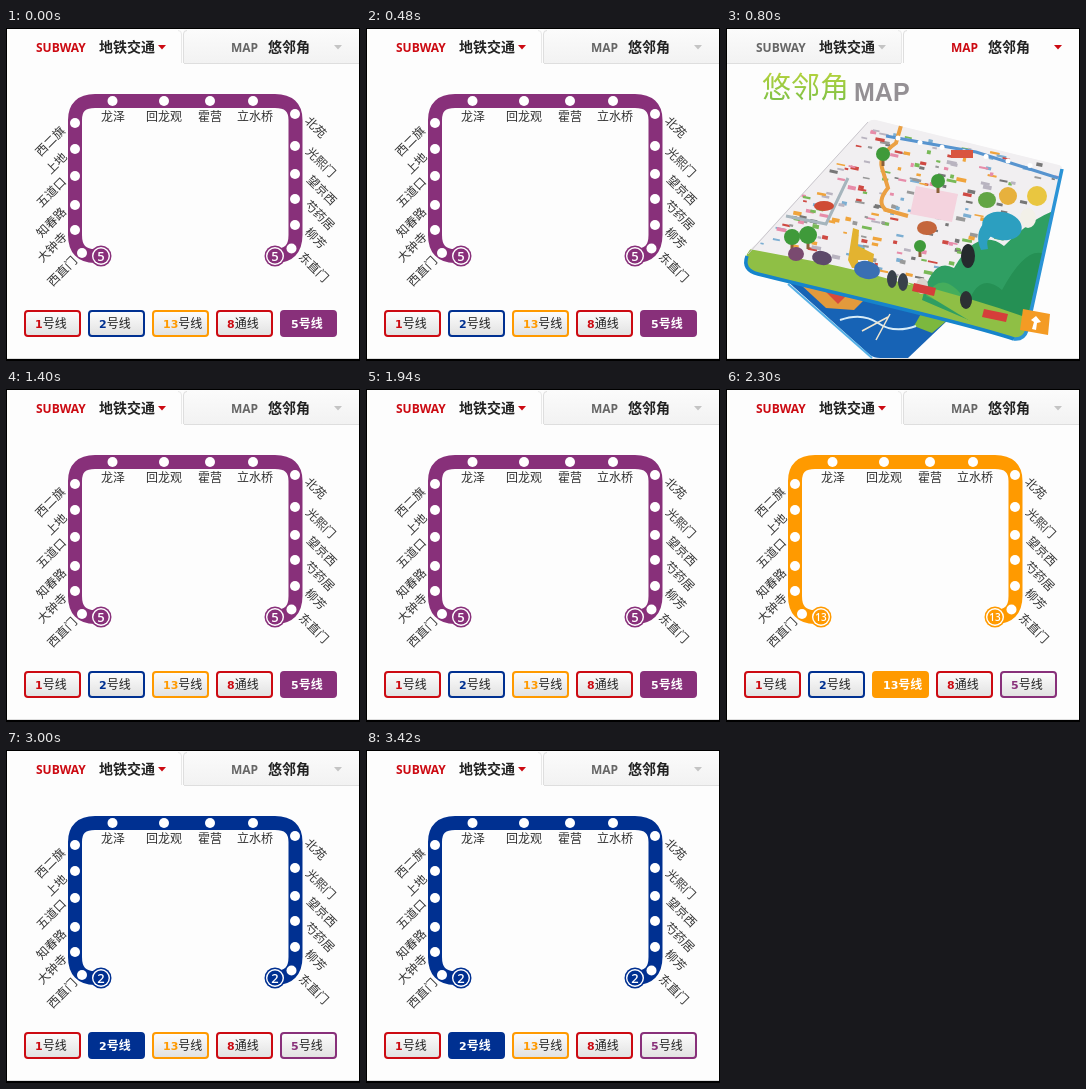
An HTML page with a canvas that plays this animation: 354 px wide and 333 px high, repeating every 3700 ms.

```html
<!DOCTYPE html>
<html lang="zh">
<head>
<meta charset="utf-8">
<title>Subway and map tabs</title>
<style>
html, body { margin: 0; width: 100%; height: 100%; overflow: hidden; background: #fff; }
canvas { display: block; }
</style>
</head>
<body>
<canvas id="stage" width="354" height="333"></canvas>
<script>
const ctx = document.getElementById('stage').getContext('2d');
const LATIN = '"Open Sans", sans-serif';
const DIGITS = '"DejaVu Sans", sans-serif';
const HAN = '"Noto Sans CJK SC", "Noto Sans CJK", sans-serif';
const RED = '#cc0a12', PURPLE = '#88307a', ORANGE = '#ff9a00', BLUE = '#003091';
const LOOP = 3700;

const scenes = [
  { at: 0, line: '5' },
  { at: 800, line: null },
  { at: 1400, line: '5' },
  { at: 2300, line: '13' },
  { at: 3000, line: '2' }
];

const lines = [
  { id: '1', label: '号线', color: RED },
  { id: '2', label: '号线', color: BLUE },
  { id: '13', label: '号线', color: ORANGE },
  { id: '8', label: '通线', color: RED },
  { id: '5', label: '号线', color: PURPLE }
];

// Each station: name, dot position, label centre, label angle in eighth turns.
const stations = [
  ['龙泽', 106.5, 73, 107, 88, 0],
  ['回龙观', 158, 73, 158, 88, 0],
  ['霍营', 204, 73, 204, 88, 0],
  ['立水桥', 247, 73, 249, 88, 0],
  ['西二旗', 69, 95, 44, 113, -1],
  ['上地', 69, 121, 50, 135, -1],
  ['五道口', 69, 148, 45, 164, -1],
  ['知春路', 69, 177, 45, 194, -1],
  ['大钟寺', 69, 202, 46, 219, -1],
  ['西直门', 76, 225, 56, 243, -1],
  ['北苑', 289, 86, 310, 99, 1],
  ['光熙门', 289, 118, 315, 134, 1],
  ['望京西', 289, 146, 316, 162, 1],
  ['芍药居', 289, 171, 314, 187, 1],
  ['柳芳', 289, 197, 310, 210, 1],
  ['东直门', 285.5, 220.5, 308, 239, 1]
];

function text(str, x, y, font, color, align = 'left') {
  ctx.font = font;
  ctx.fillStyle = color;
  ctx.textAlign = align;
  ctx.fillText(str, x, y);
}

function rect(x, y, w, h, color) {
  ctx.fillStyle = color;
  ctx.fillRect(x, y, w, h);
}

function ellipse(x, y, rx, ry, color, angle = 0) {
  ctx.beginPath();
  ctx.ellipse(x, y, rx, ry, angle, 0, Math.PI * 2);
  ctx.fillStyle = color;
  ctx.fill();
}

function shape(d, fill) {
  ctx.fillStyle = fill;
  ctx.fill(new Path2D(d));
}

function stroke(d, color, width) {
  ctx.strokeStyle = color;
  ctx.lineWidth = width;
  ctx.stroke(new Path2D(d));
}

function vertical(y0, y1, top, bottom) {
  const g = ctx.createLinearGradient(0, y0, 0, y1);
  g.addColorStop(0, top);
  g.addColorStop(1, bottom);
  return g;
}

function tab(x, w, latin, latinX, han, hanX, arrowX, active) {
  if (!active) {
    rect(x, 1, w, 34, vertical(2, 35, '#fbfbfb', '#f2f2f2'));
    rect(x, 35, w, 1, '#dedede');
  }
  text(latin, latinX, 24, `bold 12px ${LATIN}`, active ? RED : '#666');
  text(han, hanX, 24, `bold 14px ${HAN}`, '#222');
  shape(`M${arrowX} 17h8l-4 4.5z`, active ? RED : '#c4c4c4');
}

function drawFrame(mapOpen) {
  rect(0, 0, 354, 333, '#fdfdfd');
  tab(1, 174, 'SUBWAY', 30, '地铁交通', 93, 152, !mapOpen);
  tab(178, 175, 'MAP', 225, '悠邻角', 262, 328, mapOpen);
  stroke('M177.5 35V6Q177.5 2.5 181 2.5', '#dedede', 1);
  stroke('M175.5 35V6Q175.5 2.5 172 2.5', '#e8e8e8', 1);
  rect(1, 330, 352, 1, '#ddd');
  rect(0, 331, 354, 2, '#000');
  ctx.strokeStyle = '#000';
  ctx.lineWidth = 1;
  ctx.strokeRect(0.5, 0.5, 353, 332);
}

function badge(x, id, color) {
  ellipse(x, 228, 10.5, 10.5, color);
  ellipse(x, 228, 9, 9, '#fff');
  ellipse(x, 228, 7.6, 7.6, color);
  const size = id.length > 1 ? 10 : 13;
  text(id, x, 228 + size * 0.36, `600 ${size}px ${LATIN}`, '#fff', 'center');
}

function drawSubway(id) {
  const { color } = lines.find(line => line.id === id);
  stroke('M95 228H89Q69 228 69 207V92Q69 73 89 73H269Q289.5 73 289.5 92V207Q289.5 228 269 228',
    color, 14);
  badge(95, id, color);
  badge(269, id, color);
  for (const [name, x, y, lx, ly, turn] of stations) {
    ellipse(x, y, 5, 5, '#fff');
    ctx.save();
    ctx.translate(lx, ly);
    ctx.rotate(turn * Math.PI / 4);
    text(name, 0, 4.5, `12px ${HAN}`, '#333', 'center');
    ctx.restore();
  }
  lines.forEach((line, i) => button(line, 18 + i * 64, line.id === id));
}

function button({ id, label, color }, x, selected) {
  ctx.beginPath();
  ctx.roundRect(x + 1, 283, 55, 25, 3);
  ctx.fillStyle = selected ? color : vertical(284, 307, '#fcfcfc', '#e2e2e2');
  ctx.fill();
  ctx.strokeStyle = color;
  ctx.lineWidth = 2;
  ctx.stroke();
  text(id, x + 11, 300, `bold 11px ${DIGITS}`, selected ? '#fff' : color);
  const digitWidth = ctx.measureText(id).width;
  text(label, x + 11 + digitWidth, 300, `${selected ? 700 : 400} 12px ${HAN}`, selected ? '#fff' : '#222');
}

function seeded(seed) {
  return () => (seed = (seed * 16807) % 2147483647) / 2147483647;
}

function tree(x, y, r) {
  rect(x - 1.5, y, 3, r + 5, '#8a6038');
  ellipse(x, y, r, r, '#3f9a3a');
}

// Small slanted captions and icons scattered along the cloth.
function printedDetails() {
  const random = seeded(73);
  const tints = ['#e78ca9', '#999', '#f0a43c', '#777', '#78b957', '#b9b4c0', '#7caed2', '#cf4a43'];
  for (let i = 0; i < 230; i++) {
    const u = random(), v = random();
    ctx.save();
    ctx.translate(147 + 189 * u - 118 * v, 94 + 46 * u + 120 * v);
    ctx.rotate(0.2);
    rect(0, 0, 3 + random() * 7, 1.5 + random() * 2.5, tints[i % tints.length]);
    ctx.restore();
  }
}

function drawLowerLayer() {
  shape('M60 252L144 327Q148 330 154 330H182L224 290Z', '#1763b5');
  shape('M74 256L140 270L128 282L100 280Z', '#e39a3c');
  shape('M98 262l24 4-10 10z', '#d94a3c');
  shape('M196 284L224 290L206 305L188 298Z', '#7cb83e');
  stroke('M114 292q22-8 38 3t38 3', '#d7ecf8', 2);
  stroke('M136 303l26-14M150 312l14-26', '#f0e6d0', 1.5);
  stroke('M62 256L146 330', '#55b0e6', 2);
}

function drawFigures() {
  shape('M122 232L127 200l6 2-1 16 16 8-2 16h-4v-10h-10v8h-6z', '#e3b330');
  ellipse(141, 242, 13, 9, '#3a6fb3', 0.2);
  ellipse(166, 251, 5, 9, '#38404a');
  ellipse(177, 254, 5, 9, '#38404a');
  ellipse(96, 230, 10, 7, '#5d4a6a', 0.2);
  ellipse(70, 226, 8, 7, '#7a4a70');
  ellipse(196, 258, 6, 8, '#d9d4cc');
  ellipse(276, 198, 20, 14, '#2c9fc0', 0.2);
  shape('M258 195Q248 206 255 222l7-1q-3-10 5-14z', '#2c9fc0');
  ellipse(242, 228, 7, 12, '#252a2d');
  ellipse(261, 172, 9, 8, '#62a544');
  ellipse(282, 168, 9, 9, '#e7b13d');
  ellipse(311, 168, 10, 10, '#e9c640');
  ellipse(302, 190, 8, 10, '#f2f0e8');
  ellipse(240, 272, 6, 9, '#2c3032');
  shape('M188 255l22 5-2 8-22-5z', '#d53e3a');
  shape('M258 281l24 5-2 8-24-5z', '#d53e3a');
}

function drawMap() {
  text('悠邻角', 36, 70, `500 29px ${HAN}`, vertical(40, 74, '#bcd53c', '#7cc046'));
  text('MAP', 128, 73, 'bold 25px "Liberation Sans", sans-serif', '#949094');
  drawLowerLayer();

  const cloth = 'M150 92L333 137Q337 138 336 143L301 302Q298 312 288 311' +
    'C230 292 120 268 32 246Q18 241 20 229Q22 222 30 216L142 94Q146 91 150 92Z';
  ctx.save();
  ctx.clip(new Path2D(cloth));
  rect(15, 85, 330, 235, '#f1eff1');
  printedDetails();

  // Roads and rails
  stroke('M176 94L170 115Q152 128 156 140L162 160Q150 174 160 182L182 188', '#eba042', 4);
  stroke('M160 108L250 124L332 150', '#5794cf', 3);
  stroke('M60 188L100 196L122 150', '#a6b5bd', 3);
  for (let i = 0; i < 7; i++) ellipse(172 + i * 22, 110 + i * 4.6, 2.5, 2.5, '#fff');
  shape('M190 158l42 8-6 28-42-8z', '#f4d3de');
  ellipse(201, 200, 10, 7, '#c4663c');
  ellipse(98, 178, 10, 5, '#cf4b35');
  rect(225, 122, 22, 8, '#d95540');
  tree(157, 126, 7);
  tree(82, 207, 9);
  tree(66, 209, 8);
  tree(212, 153, 7);
  tree(194, 218, 6);

  // Meadow and hills
  shape('M18 220Q50 226 92 234T180 256L250 270L305 315L18 250Z', '#8fbf45');
  shape('M196 272Q206 228 228 240Q252 198 278 218Q306 190 330 182L304 310L280 308Z', '#2f9e62');
  shape('M238 288Q250 240 276 262Q300 218 318 226L296 308Z', '#259054');
  shape('M200 268Q216 240 238 270L250 290Z', '#45ad5c');
  shape('M180 254Q240 268 302 290V315H280Z', '#8fbf45');
  drawFigures();
  ctx.restore();

  stroke('M336 141L301 302Q298 312 288 311', '#2a93d6', 3.5);
  stroke('M21 228Q16 242 32 246C120 268 230 292 288 311', '#1684cb', 3.5);
  stroke('M22 226L142 94', '#c9c6cc', 1);
  shape('M297 281L324 286L322 307L294 302Z', '#f49b24');
  shape('M310 288l5 6-4 1-1 7-4-1 2-7-3-2z', '#fff');
}

function render(now) {
  const t = now % LOOP;
  const scene = scenes.findLast(s => s.at <= t) || scenes[0];
  const mapOpen = scene.line === null;
  drawFrame(mapOpen);
  if (mapOpen) drawMap();
  else drawSubway(scene.line);
}

const start = performance.now();
function tick() {
  render(performance.now() - start);
  requestAnimationFrame(tick);
}
tick();
</script>
</body>
</html>
```
